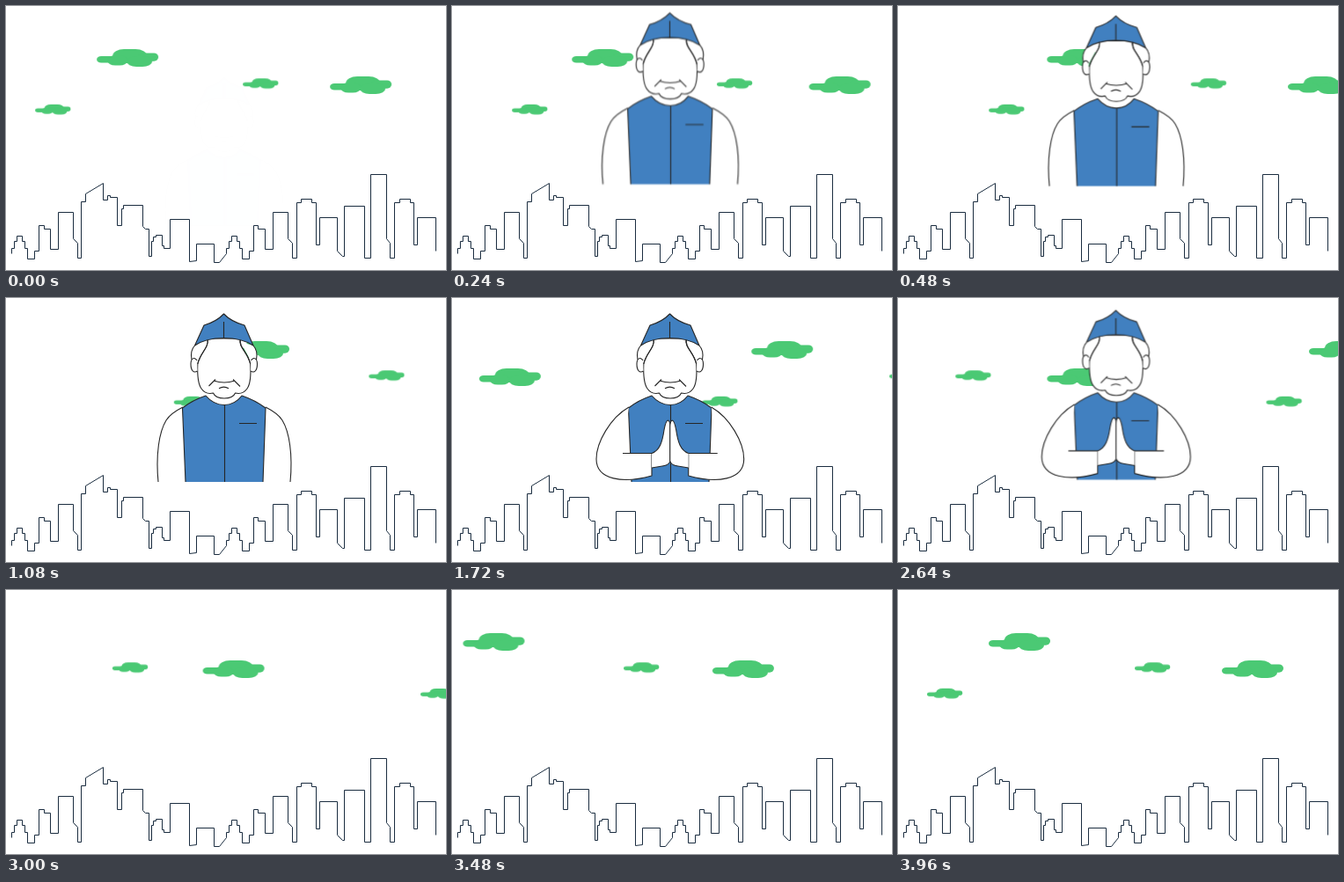
An HTML page that plays this animation: 500x300 px, repeating every 4 s.

```html
<!DOCTYPE html>
<html lang="en">
<head>
<meta charset="utf-8">
<title>City greeting</title>
<style>
  html, body { margin: 0; width: 100%; height: 100%; overflow: hidden; background: #fff; }
  svg { display: block; width: 100vw; height: 100vh; }

  .cloud, .man, .arms-down, .arms-joined { animation: 4s linear infinite; }
  .cloud { fill: #4bc974; }

  /* Each cloud leaves on the right, then re-enters from the left. */
  .high { animation-name: high; }
  .wide { animation-name: wide; }
  .small { animation-name: small; }
  .low { animation-name: low; }
  @keyframes high {
    0%, 99%, 100% { transform: translate(103px, 49px); }
    72% { transform: translate(500px, 49px); }
    72.01% { transform: translate(-101px, 49px); }
  }
  @keyframes wide {
    0%, 99%, 100% { transform: translate(368px, 80px); }
    21.12% { transform: translate(500px, 80px); }
    21.13% { transform: translate(-101px, 80px); }
  }
  @keyframes small {
    0%, 99%, 100% { transform: translate(269px, 82.3px) scale(.575); }
    43.55% { transform: translate(500px, 82.3px) scale(.575); }
    43.56% { transform: translate(-73.5px, 82.3px) scale(.575); }
  }
  @keyframes low {
    0%, 99%, 100% { transform: translate(33px, 111.8px) scale(.575); }
    79.98% { transform: translate(500px, 111.8px) scale(.575); }
    79.99% { transform: translate(-73.5px, 111.8px) scale(.575); }
  }

  .man {
    animation-name: rise, fade;
    transform-origin: 248px 113.5px;
    stroke: #262626;
    stroke-width: 1.1;
    stroke-linejoin: round;
    fill: #fff;
  }
  @keyframes rise {
    0% { transform: translateY(52px) scale(.88); animation-timing-function: ease-out; }
    7% { transform: translateY(-10.4px) scale(1.024); animation-timing-function: ease-in-out; }
    12% { transform: translateY(-5.75px) scale(1.013); animation-timing-function: ease-out; }
    14%, 58% { transform: none; animation-timing-function: ease-in-out; }
    64.5% { transform: translateY(-10.4px) scale(1.024); animation-timing-function: ease-in-out; }
    71%, 100% { transform: translateY(52px) scale(.88); }
  }
  @keyframes fade {
    0%, 72%, 100% { opacity: 0; }
    4%, 68% { opacity: 1; }
  }

  .arms-down { animation-name: lower; }
  .arms-joined { animation-name: join; }
  @keyframes lower {
    0%, 33% { opacity: 1; }
    38%, 100% { opacity: 0; }
  }
  @keyframes join {
    0%, 31% { opacity: 0; }
    37%, 100% { opacity: 1; }
  }

  .blue { fill: #4180c0; }
  .line { fill: none; }
  .bare { stroke: none; }
  .city { fill: none; stroke: #1b2d40; stroke-width: 1; }
</style>
</head>
<body>
<svg viewBox="0 0 500 300" preserveAspectRatio="none">
  <defs>
    <clipPath id="sky"><rect x="8" width="492" height="300"/></clipPath>
    <g id="cloud">
      <rect x="18" width="39" height="16" rx="13" ry="8"/>
      <rect x="47" y="4.5" width="23" height="9.2" rx="5"/>
      <rect y="8" width="24" height="7.5" rx="5" ry="3.7"/>
      <rect x="12" y="7" width="23" height="11.6" rx="9" ry="5.8"/>
      <rect x="34" y="8" width="29" height="12" rx="11" ry="6"/>
    </g>
    <path id="arm-down" d="M201 124Q187 131 182 139C174 152 170 178 173 209"/>
    <g id="arm-bent">
      <path d="M201 124C180 136 164 164 164 183C164 207 195 211 227 202V176.5H194"/>
      <path d="M227 176.5C236 173 239 164 241 150Q243 139 245.5 139Q248 140 248 147V185Q247 190 239 191L227 193"/>
    </g>
    <g id="head-side">
      <path d="M214.500 54Q209 60 210.500 69Q215 67 217 72L229 50Z" class="bare"/>
      <path d="M217 71C214 66 210 69 210 75C210 82 213 86 217.500 83"/>
      <path d="M214.500 54Q209 60 211 70" class="line"/>
      <path d="M229 46C231 57 221 61 217.800 75" class="line"/>
    </g>
  </defs>

  <g clip-path="url(#sky)">
    <use href="#cloud" class="cloud high"/>
    <use href="#cloud" class="cloud wide"/>
    <use href="#cloud" class="cloud small"/>
    <use href="#cloud" class="cloud low"/>
  </g>

  <g class="man">
    <g class="arms-down">
      <path class="bare" d="M201 124Q187 131 182 139C174 152 170 178 173 209H323C326 178 322 152 314 139Q309 131 295 124Z"/>
      <use href="#arm-down" class="line"/>
      <use href="#arm-down" class="line" transform="matrix(-1 0 0 1 496 0)"/>
    </g>

    <path class="bare" d="M231 106L227 111Q237 121.500 248 121.500T268 111L264 106Z"/>
    <path class="blue bare" d="M227 111Q236 121.500 248 121.500T268 111Q283 116 295 125L292 209H204L200.500 125Q212 116 227 111Z"/>
    <path class="line" d="M204 209L200.500 125Q212 116 227 111Q236 121.500 248 121.500T268 111Q283 116 295 125L292 209M248.500 121.500V209M265 142.500H285"/>

    <path d="M229 46C231 57 221 61 217.800 75Q217 96 222 103Q227 110 235.500 108Q238 114 248 114T260.500 108Q269 110 274 103Q279 96 277.700 75C275 61 264 57 266 46Z"/>
    <use href="#head-side"/>
    <use href="#head-side" transform="matrix(-1 0 0 1 495.500 0)"/>
    <path class="line" d="M230.500 100L238 92.500M236 94Q248 98 260 94M258 92.500L266 100.500M242 102.700Q247.500 99.500 253 102.700"/>
    <path class="blue" d="M214.500 54L225 31Q239 27 247.500 18Q256 27 271 31L281 54Q268 45.500 247.500 45.500T214.500 54Z"/>
    <path class="line" d="M247.500 27V45.500"/>

    <g class="arms-joined">
      <use href="#arm-bent"/>
      <use href="#arm-bent" transform="matrix(-1 0 0 1 495.700 0)"/>
    </g>
  </g>

  <path class="city" transform="translate(.5 .5)" d="M6 281V275H9V267H12V261H18V267H21V275H24V287H32V278H37V249H43V253H50V276H59V234H76V264L81 269V286H85V222H90V213L110 201V220H115V215H118V217H126V249H131V230H133V226H155V250L158 253H162V284H165V267H167V262H170V260H177V272H179V275H186V242H208V290L216 289V270H236V291H242L250 281V275H253V267H256V261H262V267H265V275H268V287H276V278H281V249H286V253H294V276H303V234H320V264L325 269V286H330V223H335V219H347V223H352V271H356V240H376V278L382 284H384V227H407V286H414V191H432V264L436 269V286H441V223H447V219H459V223H463V271H467V240H488V278"/>
</svg>
</body>
</html>
```
